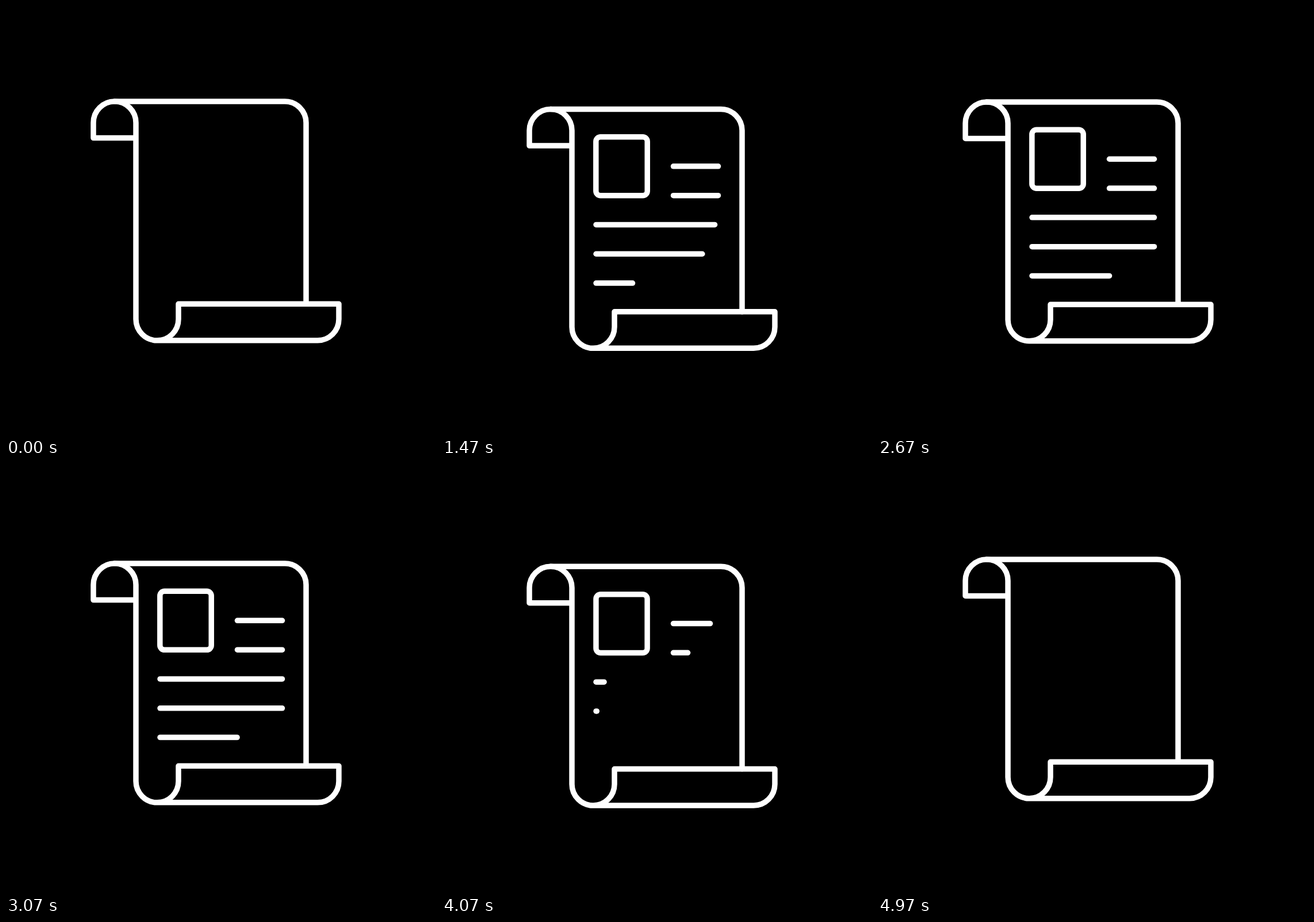
Write an HTML page that moves like this. It is 748 px wide and 748 px high and loops after 5 s.

```html
<!DOCTYPE html>
<html lang="en">
<head>
<meta charset="utf-8">
<title>Scroll document</title>
<style>
  html, body { margin: 0; height: 100%; overflow: hidden; background: #000; }
  svg { display: block; width: 100%; height: 100%; }
</style>
</head>
<body>
<svg viewBox="0 0 748 748">
  <g id="doc" fill="none" stroke="#fff" stroke-width="9.5" stroke-linecap="round" stroke-linejoin="round">
    <path d="M226 229.5H152V203A37 37 0 0 1 226 203V544.8A37 37 0 0 0 300 544.8V518.3H579V544.8A37 37 0 0 1 542 581.8H263"/>
    <path d="M189 166H485A37 37 0 0 1 522 203V518.3"/>
    <rect id="photo" x="-44.7" y="-51" width="89.4" height="102" rx="8"/>
  </g>
</svg>
<script>
const LOOP = 5000, LEAD = 31, MIRROR = 5064, STEP = 1000;
const doc = document.getElementById('doc');
const photo = document.getElementById('photo');

const lines = [[402.5, 480.5], [402.5, 480.5], [268, 480.5], [268, 480.5], [268, 402.5]].map(([x1, x2], i) => {
  const el = document.createElementNS('http://www.w3.org/2000/svg', 'path');
  doc.append(el);
  return { el, x1, x2, y: 265.3 + 50.8 * i, start: 372 + i * STEP / 6 };
});

// cubic-bezier(.72, 0, .2, 1), solved by bisection
function ease(x) {
  if (x <= 0) return 0;
  if (x >= 1) return 1;
  let lo = 0, hi = 1, u;
  for (let i = 0; i < 24; i++) {
    u = (lo + hi) / 2;
    const bx = 3 * (1 - u) * u * (.72 * (1 - u) + .2 * u) + u ** 3;
    if (bx < x) lo = u; else hi = u;
  }
  return u * u * (3 - 2 * u);
}

function draw(now) {
  const t = now % LOOP + LEAD;
  const bob = 7.5 * (1 - Math.cos(t / 2500 * 2 * Math.PI));
  doc.setAttribute('transform', `translate(0 ${bob})`);

  // The exit replays the entrance backwards
  const phase = Math.min(t, MIRROR - t);
  const grow = start => ease((phase - start) / STEP);

  const size = grow(33);
  photo.setAttribute('transform', `translate(312.5 265.3) scale(${size})`);
  photo.style.display = size > .002 ? '' : 'none';

  for (const { el, x1, x2, y, start } of lines) {
    const k = grow(start);
    el.setAttribute('d', k > 0 ? `M${x1} ${y}H${x1 + (x2 - x1) * k}` : '');
  }
}

const begin = performance.now();
function frame() {
  draw(performance.now() - begin);
  requestAnimationFrame(frame);
}
frame();
</script>
</body>
</html>
```
